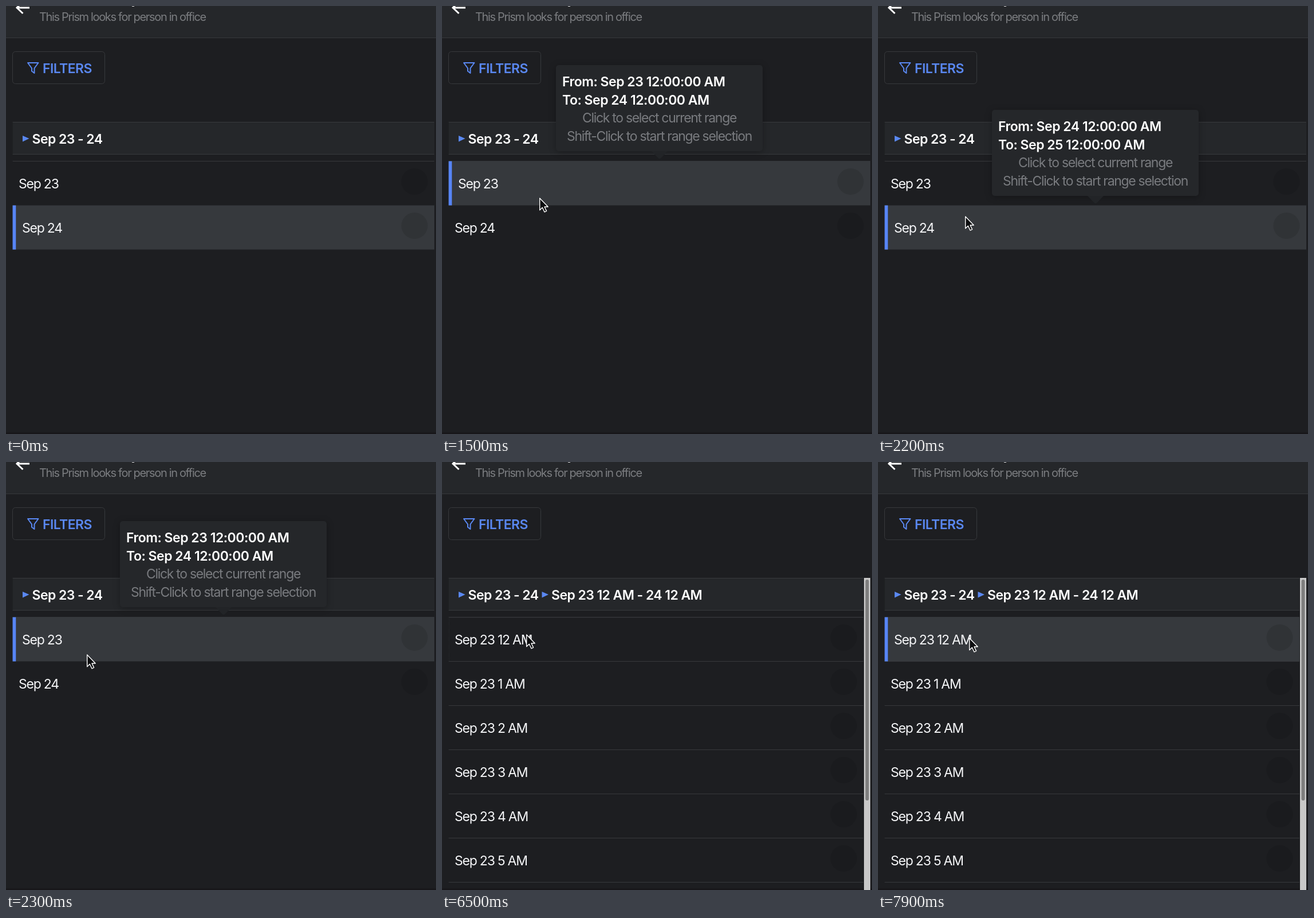
These frames come from a looping animation (751x746 px, 8000 ms). An HTML page:

```html
<!DOCTYPE html>
<html lang="en">
<head>
<meta charset="utf-8">
<title>Date range picker</title>
<style>
  html, body { margin: 0; width: 100%; height: 100%; overflow: hidden; background: #1d1e21; }
  svg { display: block; width: 100%; height: 100%; }
  text {
    font: 400 23px Inter, "Liberation Sans", sans-serif;
    font-optical-sizing: none;
    letter-spacing: -.053em;
    fill: #f6f7f9;
    white-space: pre;
  }
  .bold { font-weight: 600; letter-spacing: -.025em; fill: #fff; }
  #tip .bold { letter-spacing: -.021em; }
  .blue { fill: #5a88f2; }
  .note { fill: #797b7f; letter-spacing: -.057em; text-anchor: middle; }
  .sub { font-size: 20px; fill: #7b7d80; letter-spacing: -.067em; }
  .panel { fill: #25272a; }
  .line { fill: #37393c; }
  .outline { fill: none; stroke: #37393c; }
  .shadow { filter: drop-shadow(0 2px 6px rgba(0, 0, 0, .28)); }
</style>
</head>
<body>
<svg viewBox="0 0 751 746">
  <rect width="751" height="746" fill="#1d1e21"/>

  <rect class="panel" width="751" height="55"/>
  <rect class="line" y="55" width="751" height="1"/>
  <path d="M41 3H19M29.5 -7.5L19 3L29.5 13" fill="none" stroke="#fff" stroke-width="3"/>
  <rect x="220" width="4" height="1" fill="#d8d8d9"/>
  <text class="sub" x="58" y="25.7">This Prism looks for person in office</text>

  <rect class="outline" x="11.5" y="79.5" width="161" height="56" rx="5"/>
  <path d="M38 99H56.5L49.5 108.5V117L45 113.5V108.5Z" fill="none" stroke="#5a88f2" stroke-width="2" stroke-linejoin="round"/>
  <text class="bold blue" x="64" y="116.5">FILTERS</text>

  <g id="crumbs"></g>
  <g id="rows"></g>
  <rect y="743.5" width="751" height="2.5" fill="#171619"/>
  <g id="bar">
    <rect x="737" y="202" width="11" height="544" fill="#c8c8c8"/>
    <rect x="739.5" y="205" width="6" height="385" rx="3" fill="#7e7e7e"/>
  </g>

  <g id="tip">
    <rect class="panel shadow" x="199" y="103" width="361" height="150" rx="5"/>
    <path d="M366 253H394L383 264.5q-3 3 -6 0Z" fill="#222427"/>
    <text class="bold" id="from" x="210" y="140"></text>
    <text class="bold" id="to" x="210" y="171.5"></text>
    <text class="note" x="379.5" y="203.3">Click to select current range</text>
    <text class="note" x="379.5" y="235">Shift-Click to start range selection</text>
  </g>

  <path id="cursor" d="M.7 1V21.8L5.3 17.3L9 25L12.6 23.4L9 16H15.2Z" fill="#0c0d0f" stroke="#fff" stroke-width="1.4" stroke-linejoin="round"/>
</svg>
<script>
const LOOP = 8000, LEFT = 11.6, TOP = 270.5, ROW = 77;
const $ = id => document.getElementById(id);

// start ms, view, hovered row, tooltip scale, cursor x, cursor y
const steps = [
  [0, "days", 1, 0, -50, -50],
  [700, "days", 0, 0, 174, 314],
  [800, "days", 0, 1.08, 172, 318],
  [900, "days", 0, 1, 171, 320],
  [1500, "days", 0, 1, 170, 334],
  [1600, "days", 1, 1, 165, 391],
  [2200, "days", 1, 1, 152, 366],
  [2300, "days", 0, 1, 141, 335],
  [5400, "hours", -1, 0, 141, 335],
  [5900, "hours", -1, 0, 168, 338],
  [6000, "hours", -1, 0, 180, 340],
  [6200, "hours", -1, 0, 177, 336],
  [6300, "hours", -1, 0, 168, 326],
  [6400, "hours", -1, 0, 155, 310],
  [6500, "hours", -1, 0, 147, 300],
  [6600, "hours", 0, 0, 157, 301],
  [6800, "hours", 0, 0, 160, 301],
  [7000, "hours", 0, 0, 160, 302],
  [7300, "hours", 0, 0, 160, 306],
  [7900, "hours", 0, 0, 159, 306]
];

const views = {
  days: { right: 748, labels: ["Sep 23", "Sep 24"], crumbs: [[29, "Sep 23 - 24"]] },
  hours: {
    right: 736,
    labels: [12, 1, 2, 3, 4, 5].map(h => `Sep 23 ${h} AM`),
    crumbs: [[29, "Sep 23 - 24"], [174.5, "Sep 23 12 AM - 24 12 AM"]]
  }
};

const rect = (x, y, w, h, attrs) =>
  `<rect x="${x}" y="${y}" width="${w}" height="${h}" ${attrs}/>`;

function crumbsMarkup({ right, crumbs }) {
  const w = right - LEFT;
  return rect(LEFT, 203, w, 56, 'class="panel"')
    + rect(LEFT, 202, w, 1, 'class="line"')
    + rect(LEFT, 258, w, 1, 'class="line"')
    + crumbs.map(([x, label]) =>
      `<path class="blue" d="M${x} 226L${x + 11.5} 231L${x} 236.5Z"/>`
      + `<text class="bold" x="${x + 16.5}" y="240">${label}</text>`).join("");
}

function rowsMarkup({ right, labels }, hover, lined) {
  const w = right - LEFT;
  let out = rect(LEFT, 270, w, 1, 'class="line"');
  if (lined) out += rect(12.5, 271.5, w - 1, 76, 'fill="none" stroke="#292b2e" stroke-dasharray="1"');
  labels.forEach((label, i) => {
    const y = TOP + i * ROW, on = i === hover;
    if (lined) out += rect(LEFT, y + ROW - 0.5, w, 1, 'class="line"');
    if (on) {
      out += rect(LEFT, y, w, ROW, 'fill="#36393d"')
        + rect(LEFT, y, 5.7, ROW, 'fill="#5785f6"');
    }
    out += `<circle cx="${right - 34.5}" cy="${y + 35.5}" r="23" fill="${on ? "#303336" : "#1a1b1e"}"/>`
      + `<text x="${on ? 28 : 22}" y="${y + 47.7}">${label}</text>`;
  });
  return out;
}

function show([, name, hover, scale, x, y]) {
  const view = views[name], lined = name === "hours";
  $("crumbs").innerHTML = crumbsMarkup(view);
  $("rows").innerHTML = rowsMarkup(view, hover, lined);
  $("bar").style.display = lined ? "" : "none";
  $("tip").style.display = scale ? "" : "none";
  $("tip").setAttribute("transform",
    `translate(380 ${266 + hover * 78}) scale(${scale}) translate(-380 -266)`);
  $("from").textContent = `From: Sep ${23 + hover} 12:00:00 AM`;
  $("to").textContent = `To: Sep ${24 + hover} 12:00:00 AM`;
  $("cursor").setAttribute("transform", `translate(${x} ${y})`);
}

let current;
function tick() {
  const t = performance.now() % LOOP;
  const step = steps.findLast(s => s[0] <= t);
  if (step !== current) show(current = step);
  requestAnimationFrame(tick);
}
tick();
</script>
</body>
</html>
```
